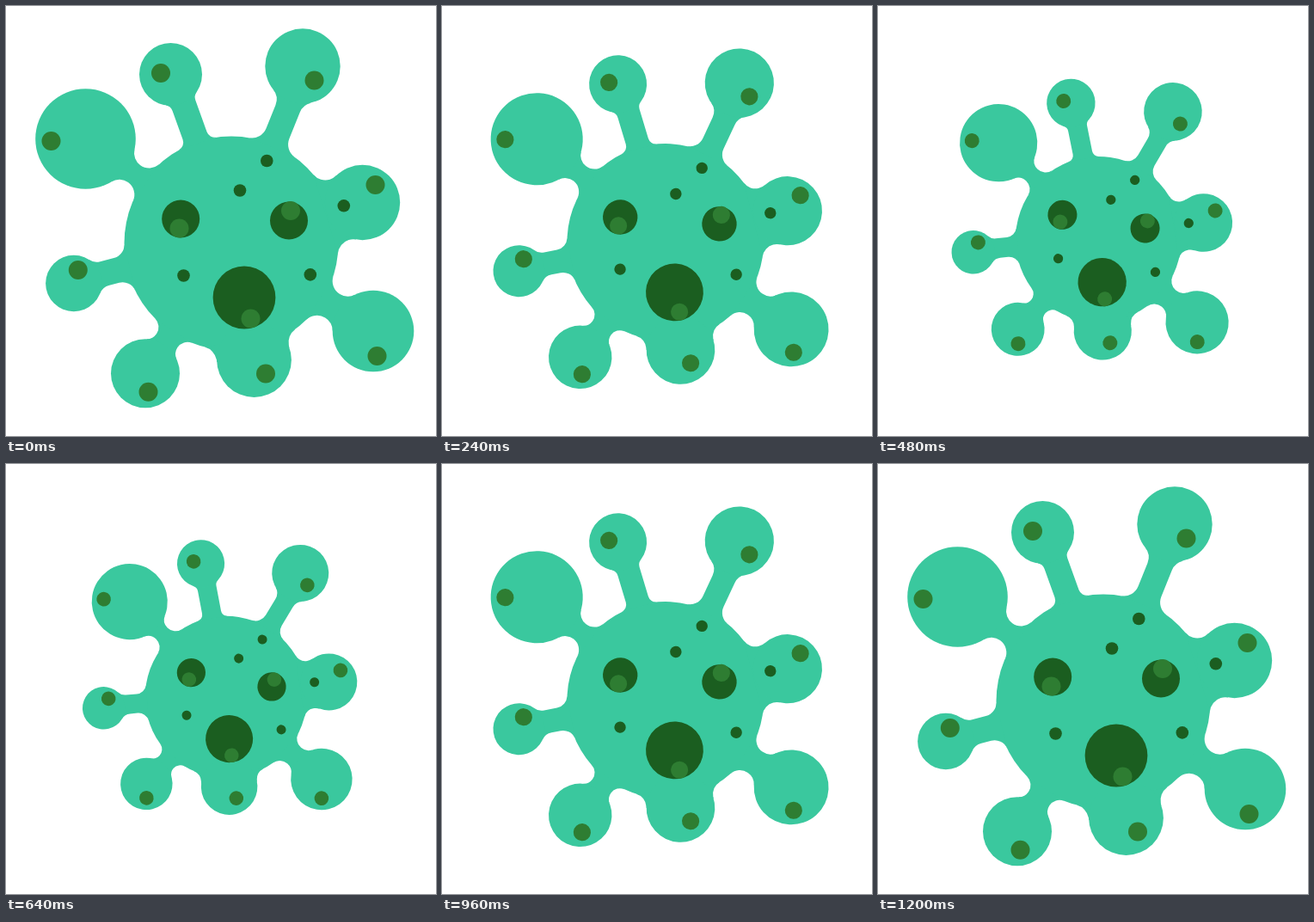
An HTML page for the animation above (2.04 s loop, 500x500 px).

```html
<!DOCTYPE html>
<html lang="en">
<head>
<meta charset="utf-8">
<title>Virus</title>
<style>
  html, body { margin: 0; width: 100%; height: 100%; overflow: hidden; background: #fff; }
  svg { display: block; width: 100%; height: 100%; }
  .skin { fill: #3ac89e; }
  .dark { fill: #1b5e20; }
  .spot { fill: #2e7d32; }
</style>
</head>
<body>
<svg viewBox="0 0 500 500"><g id="virus"></g></svg>
<script>
const virus = document.getElementById('virus');
const BODY = { x: 262, y: 276, r: 124.5 };
const NECK = { minGap: 30, halfWidth: 14.7, shift: 2.3 };

// Bulbs: centre, radius, spot offset, radius of the fillets joining bulb and body
const bulbs = [
  [92.5, 154.5, 58.3, -40, 2.5, 17.5],
  [191.5, 79.5, 36.5, -11.5, -1.5, 10],
  [345, 70, 43.7, 13.5, 16.5, 18],
  [414.5, 228.5, 43.7, 15, -20.5, 18],
  [427, 378, 47.3, 4.5, 29, 18],
  [288.5, 411.5, 43.4, 13.5, 16, 19],
  [162, 427.3, 40, 3.5, 21.5, 14],
  [78.8, 322.5, 32.7, 5, -15.5, 16],
];
const eyes = [
  [203.2, 247.5, 22, -1.7, 11],
  [329, 249.5, 22, 2, -11.5],
  [277, 339, 36.4, 7.5, 24.5],
];
const dots = [[303.3, 180], [272, 214.5], [392.8, 232.3], [206.5, 313.5], [353.8, 312.4]];

function add(tag, attributes) {
  const node = document.createElementNS(virus.namespaceURI, tag);
  for (const name in attributes) node.setAttribute(name, attributes[name]);
  virus.append(node);
}

function circle(className, cx, cy, r) {
  add('circle', { class: className, cx, cy, r });
}

// Connects body and bulb, with the x axis running from the body centre to the bulb.
// Near bulbs share one fillet per side; far ones get a straight neck between two.
function arm(x, y, r, fillet) {
  const dx = x - BODY.x, dy = y - BODY.y, distance = Math.hypot(dx, dy);
  const toBody = BODY.r + fillet, toBulb = r + fillet;
  const hasNeck = distance - BODY.r - r > NECK.minGap;
  const along = (toBody ** 2 - toBulb ** 2 + distance ** 2) / (2 * distance);

  const edge = side => {
    const lateral = hasNeck
      ? NECK.shift + side * (NECK.halfWidth + fillet)
      : side * Math.sqrt(toBody ** 2 - along ** 2);
    const bodyX = Math.sqrt(toBody ** 2 - lateral ** 2);
    const bulbX = Math.sqrt(toBulb ** 2 - lateral ** 2);
    const inner = lateral - side * fillet;
    return [
      [bodyX * BODY.r / toBody, lateral * BODY.r / toBody],
      [bodyX, inner],
      [distance - bulbX, inner],
      [distance - bulbX * r / toBulb, lateral * r / toBulb],
    ];
  };
  const trace = ([a, b, c, d]) => {
    const arc = `A${fillet} ${fillet} 0 0 1 `;
    return `${a}${arc}${b}L${c}${arc}${d}`;
  };

  add('path', {
    class: 'skin',
    d: `M${trace(edge(1))}L${trace(edge(-1).reverse())}Z`,
    transform: `translate(${BODY.x} ${BODY.y}) rotate(${Math.atan2(dy, dx) * 180 / Math.PI})`,
  });
}

circle('skin', BODY.x, BODY.y, BODY.r);
for (const [x, y, r, , , fillet] of bulbs) {
  arm(x, y, r, fillet);
  circle('skin', x, y, r);
}
for (const [x, y, r] of eyes) circle('dark', x, y, r);
for (const [x, y] of dots) circle('dark', x, y, 7.3);
for (const [x, y, , dx, dy] of [...bulbs, ...eyes]) circle('spot', x + dx, y + dy, 11);

const LOOP = 2040, STEP = 40, HALF = 600;
const SHRINK = 0.2465, TURN = 9.1;

// cubic-bezier(.42, 0, .58, 1), solved by bisection
function easeInOut(x) {
  let lo = 0, hi = 1;
  for (let i = 0; i < 24; i++) {
    const u = (lo + hi) / 2;
    if (((0.52 * u - 0.78) * u + 1.26) * u < x) lo = u; else hi = u;
  }
  return lo * lo * (3 - 2 * lo);
}

function draw(now) {
  const time = Math.floor((now % LOOP) / STEP) * STEP;
  const k = easeInOut(Math.max(0, 1 - Math.abs(time - HALF) / HALF));
  virus.setAttribute('transform',
    `translate(250 250) rotate(${TURN * k}) scale(${1 - SHRINK * k}) translate(-250 -250)`);
  requestAnimationFrame(draw);
}
draw(performance.now());
</script>
</body>
</html>
```
